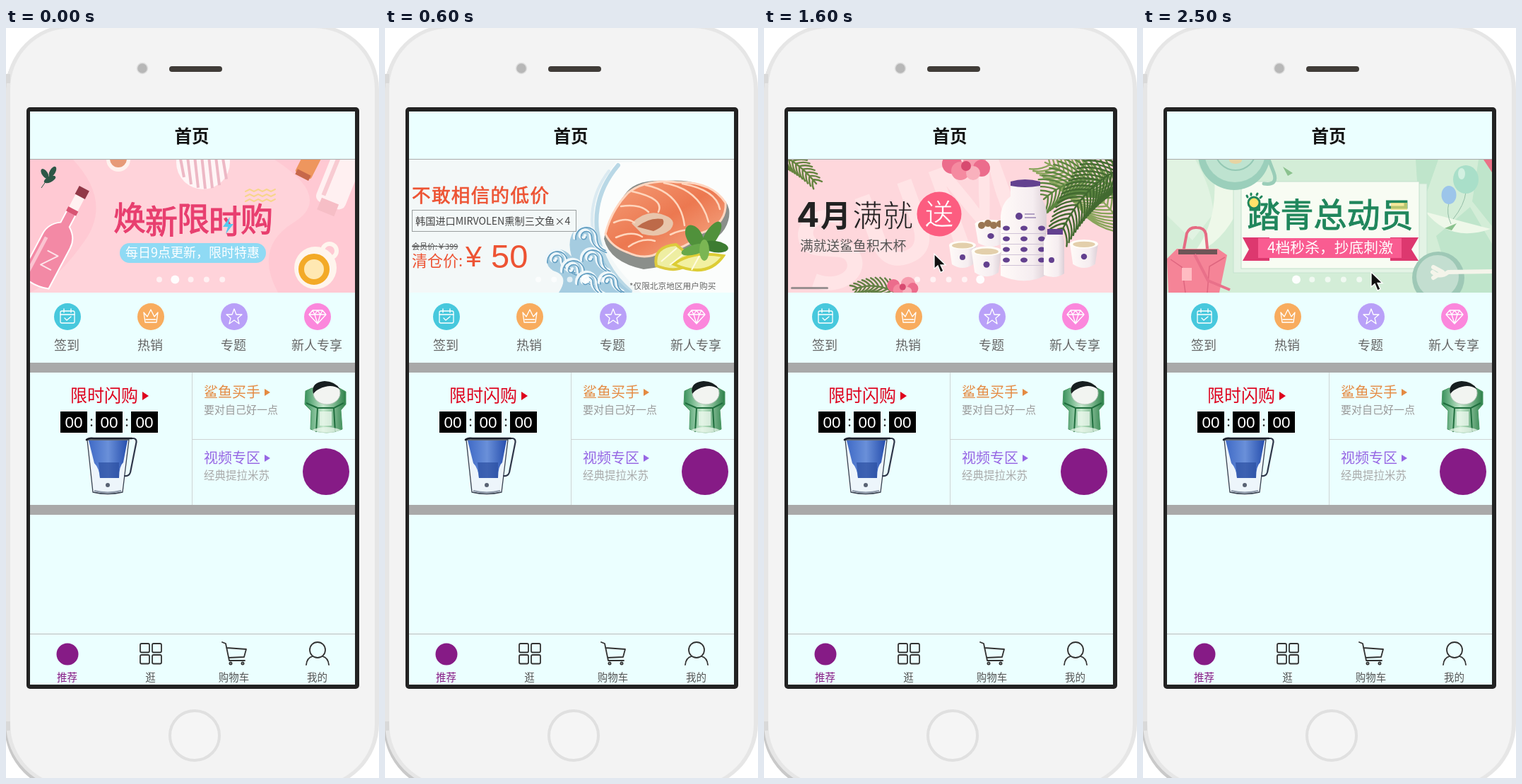
Write an HTML page that moves like this. It is 528 by 1060 pixels and loops after 2.6 s.

```html
<!DOCTYPE html>
<html lang="zh-CN">
<head>
<meta charset="utf-8">
<title>首页</title>
<style>
  html, body { margin: 0; width: 100%; height: 100%; overflow: hidden; background: #fff; }
  svg { display: block; width: 528px; height: 1060px; }
  text { font-family: "Noto Sans CJK SC", "Noto Sans CJK", sans-serif; }
  .mid { text-anchor: middle; }
  .latin { font-family: "Liberation Sans", sans-serif; }
  .line { fill: none; stroke-linecap: round; stroke-linejoin: round; }
</style>
</head>
<body>
<svg viewBox="0 0 528 1060">
  <defs>
    <clipPath id="banner"><rect x="34" y="186" width="460" height="188"/></clipPath>
    <clipPath id="page"><rect x="34" y="186" width="460.5" height="188"/></clipPath>
    <linearGradient id="blue" x2="1"><stop stop-color="#3f6ac6"/><stop offset=".5" stop-color="#6a90d9"/><stop offset="1" stop-color="#274fae"/></linearGradient>
    <linearGradient id="glass" x2="1"><stop stop-color="#37905a"/><stop offset=".45" stop-color="#c5e8cd"/><stop offset="1" stop-color="#2c8049"/></linearGradient>
    <linearGradient id="milk" x2="1"><stop stop-color="#fffaf8"/><stop offset=".7" stop-color="#f5edf0"/><stop offset="1" stop-color="#dccfd6"/></linearGradient>
    <linearGradient id="meat" x2="1" y2="1"><stop stop-color="#f5a07a"/><stop offset=".5" stop-color="#ec7850"/><stop offset="1" stop-color="#f7b290"/></linearGradient>
    <g id="jug">
      <path d="M3 5H62L53 79Q32 84 11 79Z" fill="#edf5fb" stroke="#39404f" stroke-width="1.3"/>
      <path d="M5 6H60L54 37Q48 42 48 59H21Q20 45 13 38Z" fill="url(#blue)"/>
      <path d="M19 37H48V59H21Z" fill="#274a9c" opacity=".65"/>
      <path class="line" d="M58 3H69Q74 4 72 11L64 51Q62 57 56 56" stroke="#30374a" stroke-width="2.2"/>
      <path class="line" d="M2 5Q5 2 12 3H66" stroke="#1b1f2b" stroke-width="2.6"/>
      <circle cx="32" cy="69" r="3" fill="#596273"/>
      <path d="M13 77Q32 82 51 77" fill="none" stroke="#8c98a8" stroke-width="2"/>
    </g>
    <g id="cup">
      <path d="M-19 -14L-15 13Q0 23 15 13L19 -14Z" fill="url(#milk)"/>
      <ellipse cy="-14" rx="19" ry="6" fill="#fffdf8"/><ellipse cy="-13.5" rx="15" ry="4" fill="#e3cfab"/>
      <circle cy="3" r="4" fill="#63408e"/>
    </g>
    <g id="flower" fill="#ec6c8c">
      <circle cx="-18" r="14"/><circle cx="14" cy="-3" r="16" fill="#f79cae"/><circle cx="24" cy="6" r="12"/>
      <circle cx="-6" cy="10" r="13" fill="#f58aa0"/><circle cx="12" cy="13" r="10" fill="#f9b1bd"/><circle cx="2" cy="3" r="7" fill="#d84a70"/>
    </g>
  </defs>

  <!-- phone -->
  <rect x="-2" y="1" width="480" height="1078" rx="92" fill="#c9c9c9"/>
  <rect x="0" y="-5" width="528" height="1080" rx="92" fill="#e6e6e6"/>
  <path d="M0 65H6V78H0ZM0 980H6V993H0Z" fill="#d9d9d9"/>
  <rect x="6" y="0" width="516" height="1070" rx="86" fill="#f3f3f3"/>
  <circle cx="193" cy="57" r="7.5" fill="#b7b7b7" stroke="#dedede" stroke-width="1.5"/>
  <rect x="231" y="54" width="75" height="8" rx="4" fill="#403c38"/>
  <circle cx="267" cy="1000" r="35" fill="#f5f5f5" stroke="#e0e0e0" stroke-width="4"/>
  <rect x="29" y="112" width="471" height="822" rx="5" fill="#222"/>
  <rect x="34" y="118" width="460" height="810" fill="#ebffff"/>
  <text class="mid" x="263" y="162" font-size="24.5" font-weight="700" fill="#111">首页</text>
  <path d="M34 185.5H494" stroke="#aaa"/>

  <g clip-path="url(#banner)">
    <!-- cosmetics -->
    <g class="slide" clip-path="url(#page)">
      <rect x="34" y="186" width="460" height="188" fill="#ffd3da"/>
      <path d="M34 186H95Q150 245 112 300T34 374ZM380 186H494V374H385Q350 310 407 275T380 186Z" fill="#ffc5cf" opacity=".65"/>
      <g fill="#2d5747"><ellipse cx="55" cy="206" rx="4" ry="8" transform="rotate(-35 55 206)"/><ellipse cx="66" cy="203" rx="4" ry="8" transform="rotate(30 66 203)"/><ellipse cx="62" cy="214" rx="4" ry="9" transform="rotate(65 62 214)"/></g>
      <path d="M50 226L68 200" stroke="#2d5747"/>
      <g transform="translate(108 232) rotate(28)">
        <path d="M-7 28H7V52Q22 62 22 78V143Q0 151 -22 143V78Q-22 62 -7 52Z" fill="#f389a5" stroke="#fff" stroke-width="2"/>
        <path d="M-15 80V139" stroke="#fbc4d1" stroke-width="5"/><path class="line" d="M-4 96H12L-4 118H12" stroke="#fde3e9" stroke-width="2"/>
        <rect x="-7" y="4" width="14" height="26" fill="#fff1f1"/><rect x="-8" y="-6" width="16" height="13" fill="#913847"/><rect x="-8" y="27" width="16" height="7" fill="#d85473"/>
      </g>
      <circle cx="159" cy="186" r="17" fill="#fff1ed"/><circle cx="159" cy="185" r="12" fill="#e79a77"/>
      <g id="stripes"><circle cx="279" cy="190" r="38" fill="#fff5f6"/></g>
      <g transform="translate(430 190) rotate(27)"><rect x="-13" y="-18" width="25" height="39" rx="3" fill="#ee965e"/><rect x="-11" y="16" width="21" height="8" fill="#c7684a"/></g>
      <g transform="translate(471 215) rotate(22)"><rect x="-22" y="-55" width="44" height="94" rx="10" fill="#fff0f1"/><rect x="-13" y="32" width="26" height="18" fill="#f6bec6"/><path d="M-12 -45V28" stroke="#f8cbd2" stroke-width="6"/></g>
      <circle cx="458" cy="315" r="10" fill="none" stroke="#fff5ee" stroke-width="6"/><circle cx="438" cy="339" r="30" fill="#fff5ed"/><circle cx="436" cy="341" r="18" fill="#ffe8b2" stroke="#f3aa27" stroke-width="8"/>
      <path class="line" d="M339 231l6 -3 6 3 6 -3 6 3 6 -3 6 3 6 -3M339 238l6 -3 6 3 6 -3 6 3 6 -3 6 3 6 -3M339 245l6 -3 6 3 6 -3 6 3 6 -3 6 3 6 -3" stroke="#f7d58d" stroke-width="2"/>
      <text x="152 197 242 287 332" y="285 290 286 290 287" font-size="46" font-weight="500" fill="#e83f6f" stroke="#e83f6f" stroke-width="1.2">焕新限时购</text>
      <path d="M317 267L307 281H314L311 291L322 277H315Z" fill="#55c9ef"/>
      <rect x="161" y="304" width="207" height="28" rx="14" fill="#8fdaf4"/>
      <text class="mid" x="264" y="324" font-size="18" fill="#fff">每日9点更新，限时特惠</text>
    </g>

    <!-- flash sale -->
    <g class="slide" clip-path="url(#page)">
      <rect x="34" y="186" width="460" height="188" fill="#f3cf08"/>
      <g fill="#fadd52" opacity=".75"><circle cx="75" cy="218" r="37"/><circle cx="190" cy="196" r="25"/><circle cx="245" cy="330" r="45"/><circle cx="145" cy="358" r="32"/><circle cx="58" cy="333" r="24"/></g>
      <path d="M323 186H471Q495 209 500 235V374H335Q276 329 278 257Q281 217 323 186Z" fill="#effbff"/>
      <path d="M297 209L309 186H331L319 208ZM470 186H494V214Q480 207 470 186ZM79 374L92 349L133 357L128 374ZM190 374L199 352L236 359L231 374Z" fill="#2564a7"/>
      <path d="M304 211L314 190L324 196L316 211ZM477 186H488L494 202ZM93 374L96 360H116L113 374ZM207 374L210 363L225 365L222 374Z" fill="#fff06b"/>
      <g fill="#ef2221"><circle cx="121" cy="206" r="4"/><circle cx="263" cy="201" r="5"/><circle cx="41" cy="369" r="10"/></g>
      <g font-weight="900">
        <text transform="translate(75 246) rotate(-6)" font-size="18.5" font-weight="700" fill="#171717">总有你想不到的<tspan fill="#e9201e">低价</tspan></text>
        <text transform="translate(45 310) rotate(-6.5)" font-size="62" fill="#f01917">限时<tspan font-size="55" fill="#171717">抢购</tspan></text>
        <text transform="translate(69 335) rotate(-6)" font-size="19" font-weight="700" fill="#171717">仅限今日<tspan font-family="Inter, sans-serif" font-size="20">12:00–23:59</tspan></text>
      </g>
      <use href="#jug" transform="translate(355 215) scale(1.27 1.24)"/>
      <path d="M494 316H272A12 12 0 0 0 272 340H494ZM494 345H249A11 11 0 0 0 249 367H494Z" fill="#ef1115"/>
      <g fill="#fff">
        <text x="289" y="333.5" font-size="16.6">德QVZ滤水壶阻垢款2.7蓝</text>
        <text x="251" y="362" font-size="16.5">闪购价</text><text x="317" y="361" font-size="16">¥199</text>
        <text x="390" y="361" font-size="15.5" fill="#ffd6d6">会员价: ¥208</text>
      </g>
      <path d="M382 356H494" stroke="#ffd6d6"/>
    </g>

    <!-- salmon -->
    <g class="slide" clip-path="url(#page)">
      <rect x="34" y="186" width="460" height="188" fill="#f3f8f8"/>
      <path d="M327 190Q280 250 318 321Q331 345 362 374H494V186Z" fill="#fbfdfc"/>
      <path class="line" d="M330 194Q295 235 300 286Q307 338 347 372" stroke="#b9d8e6" stroke-width="6"/>
      <path class="line" d="M317 202Q286 242 295 294" stroke="#dbeaf1" stroke-width="4"/>
      <path d="M246 374Q262 350 238 343Q222 332 235 318Q249 306 264 323Q256 294 273 282Q295 276 301 300Q309 345 350 374Z" fill="#a5cce0"/>
      <g id="waves" class="line"></g>
      <path d="M310 298Q316 265 339 236Q353 213 398 216Q445 212 473 237Q492 249 486 272Q479 298 446 306Q418 336 366 341Q318 331 310 298Z" fill="#8b8f8b"/>
      <path d="M312 291Q320 258 344 233Q369 213 414 218Q463 217 482 247Q484 278 447 290Q427 314 391 315Q371 330 343 317Q320 309 312 291Z" fill="url(#meat)" stroke="#ffd6c0" stroke-width="3"/>
      <path d="M349 276Q370 256 391 263Q416 270 404 285Q388 298 364 291Z" fill="#e8c5ab"/>
      <path d="M357 281Q374 267 393 270Q399 279 380 287Z" fill="#bd6a49"/>
      <path class="line" d="M350 231Q396 241 387 260M369 222Q418 232 424 279M334 252Q361 248 373 260M395 219Q446 228 458 274M421 220Q469 229 474 256M324 275Q342 267 353 275M327 296Q350 286 364 295M345 309Q364 296 382 301M404 292Q425 282 441 287" stroke="#ffd6bd" stroke-width="2.5"/>
      <path d="M384 336Q379 309 412 306L436 326Q420 350 384 336Z" fill="#eeeea2" stroke="#ddca3d" stroke-width="4"/>
      <path d="M409 334Q433 314 479 322Q456 355 409 334Z" fill="#f2f0a1" stroke="#ddcd35" stroke-width="4"/>
      <path d="M391 330L413 311M403 335L426 317M434 342L445 322" stroke="#fffbe0" stroke-width="2"/>
      <g fill="#50913b"><ellipse cx="438" cy="295" rx="11" ry="18" transform="rotate(-30 438 295)"/><ellipse cx="463" cy="294" rx="9" ry="23" transform="rotate(32 463 292)"/><ellipse cx="439" cy="313" rx="20" ry="7" transform="rotate(-15 439 313)" fill="#67a84a"/><ellipse cx="467" cy="309" rx="19" ry="8" transform="rotate(8 467 309)" fill="#3d7c31"/><ellipse cx="452" cy="314" rx="7" ry="15" fill="#7bb653"/></g>
      <text x="38" y="246" font-size="26.5" letter-spacing="1.4" font-weight="500" fill="#ed5333" stroke="#ed5333" stroke-width=".7">不敢相信的低价</text>
      <rect x="38.5" y="257.5" width="232" height="30" fill="none" stroke="#9a9f9f"/>
      <text x="43" y="277.5" font-size="14.2" fill="#444">韩国进口MIRVOLEN熏制三文鱼×4</text>
      <text x="38" y="313" font-size="11" fill="#555" text-decoration="line-through">会员价:￥399</text>
      <text x="38" y="337" font-size="22" fill="#ed5333">清仓价:</text>
      <text class="latin" x="114" y="337" font-size="41" fill="#ed5333">¥</text><text class="latin" x="150" y="339" font-size="47" fill="#ed5333">50</text>
      <text x="346" y="369" font-size="11.7" fill="#666">*仅限北京地区用户购买</text>
    </g>

    <!-- cups -->
    <g class="slide" clip-path="url(#page)">
      <rect x="34" y="186" width="460" height="188" fill="#fed7dc"/>
      <text transform="translate(67 381) rotate(-20)" font-size="148" font-weight="700" fill="#ffe4e6">SUM</text>
      <g id="fronds"></g>
      <use href="#flower" x="284" y="192"/><use href="#flower" transform="translate(195 364) scale(.65)"/>
      <text y="281" font-size="43" font-weight="700" fill="#222"><tspan x="46" font-family="Inter, sans-serif" font-size="48">4</tspan><tspan x="80">月</tspan><tspan x="125" font-weight="300" stroke="#fed7dc" stroke-width=".9">满就</tspan></text>
      <circle cx="248" cy="263" r="31.5" fill="#fc5d80"/><text class="mid" x="248" y="278" font-size="41" font-weight="300" fill="#fff" stroke="#fc5d80" stroke-width=".8">送</text>
      <text x="51" y="315" font-size="18.8" fill="#555">满就送鲨鱼积木杯</text>
      <use href="#cup" transform="translate(321 291) scale(1.18 1)"/>
      <g fill="#9a7653"><circle cx="308" cy="279" r="5"/><circle cx="317" cy="276" r="5"/><circle cx="325" cy="279" r="5"/><circle cx="334" cy="277" r="5"/></g>
      <use href="#cup" x="281" y="321"/><use href="#cup" transform="translate(453 320) scale(1.05)"/>
      <path d="M349 220H391V238Q401 252 400 266V349Q370 365 335 350V266Q336 248 349 238Z" fill="url(#milk)"/>
      <path d="M349 217Q369 211 391 217V223Q369 227 349 223Z" fill="#63418f"/>
      <circle cx="361" cy="266" r="5" fill="#63418f"/><path d="M369 263H383M369 268H385" stroke="#9b86b4" stroke-width="1.5"/>
      <g id="marks" fill="#63418f"></g>
      <path d="M401 290H422L425 301V347Q412 356 396 349V301Z" fill="url(#milk)"/><path d="M401 284H423V292H401Z" fill="#63418f"/><circle cx="407" cy="328" r="4" fill="#63418f"/>
      <use href="#cup" transform="translate(315 331) scale(1.12)"/>
    </g>

    <!-- spring -->
    <g class="slide" clip-path="url(#page)">
      <rect x="34" y="186" width="460" height="188" fill="#d3edd7"/>
      <path d="M386 186H418L391 263ZM475 186H494V280L466 245ZM415 294L463 253L494 305V374H440Z" fill="#bfe5cb"/>
      <path d="M34 186H74Q96 223 100 262L70 300L34 265Z" fill="#e1f3e2"/>
      <path d="M98 186Q112 270 70 320Q122 302 145 230M400 260Q435 304 492 284" fill="#eef8e9"/>
      <rect x="128" y="220" width="274" height="126" fill="#e3f3e5" stroke="#c5e3d0"/>
      <rect x="139" y="217" width="252" height="123" fill="#f8fcf3" stroke="#c1e0cb"/>
      <path class="line" d="M171 220Q192 223 185 204L178 186" stroke="#9acdb8" stroke-width="5"/>
      <circle cx="129" cy="178" r="51" fill="#9bcfbb"/><circle cx="130" cy="175" r="43" fill="#bee3d0"/><circle cx="131" cy="172" r="29" fill="none" stroke="#94c8b4" stroke-width="2"/><ellipse cx="131" cy="187" rx="9" ry="5" fill="#e7d4a3"/>
      <path d="M433 247Q429 262 436 277M457 232Q455 250 439 270" fill="none" stroke="#94bda6"/>
      <ellipse cx="457" cy="214" rx="18" ry="20" fill="#a9dfc9"/><ellipse cx="433" cy="236" rx="10.5" ry="13" fill="#9cc5ea"/><ellipse cx="451" cy="206" rx="5" ry="8" fill="#d2f0e1"/>
      <path d="M482 186H494V204Z" fill="#ea7187"/><path d="M198 196L212 205L205 209ZM427 283L444 276L437 286Z" fill="#8bc28e"/>
      <path class="line" d="M56 322L62 290Q66 281 76 282Q87 282 89 291L92 322" stroke="#e56b83" stroke-width="4"/>
      <path d="M34 326L48 312H106L119 321L108 374H36Z" fill="#f58497"/><path d="M50 313H105V320H50Z" fill="#6d5557"/><path d="M39 327L55 338L60 374M116 324L94 337L91 374" fill="none" stroke="#de667f" stroke-width="1.5"/><path d="M73 320L92 357L123 370" fill="none" stroke="#e9718a" stroke-width="4"/><rect x="55" y="339" width="14" height="18" fill="#ffbcc2"/>
      <circle cx="418" cy="353" r="37" fill="#9ec8b6"/><circle cx="417" cy="351" r="30" fill="#c3ded0"/><path class="line" d="M410 345Q420 354 432 345L494 344M411 338L424 345L411 353" stroke="#f4f4ea" stroke-width="6"/>
      <path d="M141 296H179V329H141L150 313ZM390 296H350V329H390L380 313Z" fill="#dd386f"/><path d="M163 297H366V325H163Z" fill="#f95c91"/>
      <text class="mid" x="265" y="281" font-size="47" font-weight="500" fill="#20865c" stroke="#20865c">踏青总动员</text>
      <circle cx="157" cy="247" r="8" fill="#ffe26a" stroke="#20865c" stroke-width="3"/><path class="line" d="M148 239l-1 -2M153 236l0 -2M161 236l1 -2M166 240l2 -2" stroke="#20865c" stroke-width="3"/>
      <rect x="351" y="247" width="23" height="10" fill="#f5e178" opacity=".7"/>
      <text class="mid" x="265" y="318" font-size="20.8" font-weight="300" fill="#fff">4档秒杀，抄底刺激</text>
    </g>
    <g id="dots" fill="#fff"></g>
    <rect id="indicator" x="38" y="366" width="53" height="3" rx="1.5" fill="#777" opacity=".75"/>
  </g>

  <!-- shortcuts -->
  <g id="shortcuts"></g>
  <g class="line" stroke="#fff" stroke-width="1.3">
    <rect x="77" y="400" width="20" height="17" rx="2"/><path d="M77 405H97M82 397V402M92 397V402M83 410L86 413L92 408"/>
    <path d="M195 402L200 408L205 398L210 408L215 402L213 416H197ZM198 412H212"/>
    <path d="M323 397L326 405L334 405L328 410L330 418L323 413L316 418L318 410L312 405L320 405Z"/>
    <path d="M434 399H448L453 405L441 418L429 405ZM429 405H453M434 399L437 405L441 418L445 405L448 399M437 405L441 399L445 405"/>
  </g>

  <!-- panels -->
  <path d="M34 473H494V487H34ZM34 674H494V688H34Z" fill="#a9a9a9"/>
  <path d="M263.5 487V674M263 581.5H494" stroke="#cfd4d4"/>
  <text x="91" y="528" font-size="24" fill="#de001d">限时闪购</text><path d="M193 514L202 520L193 526Z" fill="#de001d"/>
  <g id="clock"></g>
  <use href="#jug" x="112" y="577"/>
  <text x="280" y="522" font-size="20" fill="#e48a42">鲨鱼买手</text><path d="M366 510L374 515L366 520Z" fill="#e48a42"/>
  <text x="280" y="544.5" font-size="15" fill="#999">要对自己好一点</text>
  <text x="280" y="615" font-size="20" fill="#9666e4">视频专区</text><path d="M366 603L374 608L366 613Z" fill="#9666e4"/>
  <text x="280" y="638" font-size="15.5" fill="#aaa">经典提拉米苏</text>
  <path d="M424 513L433 509H472L481 514V532L474 540L476 567Q454 577 431 567L432 541L423 532Z" fill="url(#glass)" stroke="#4a9864"/>
  <path d="M425 530L441 537L439 571M478 530L464 537L466 571M441 537H464" fill="none" stroke="#1f6e3e" stroke-width="2"/>
  <path d="M444 542H461V562H444ZM433 568Q454 560 474 568Q454 577 433 568Z" fill="#ecf8ee" opacity=".75"/>
  <ellipse cx="454" cy="516" rx="19" ry="16" fill="#f2f4f1" stroke="#b3c6b8"/>
  <path d="M435 517Q431 501 451 499Q467 500 473 511Q464 504 452 507Q440 510 435 517Z" fill="#171e20"/>
  <circle cx="453" cy="627" r="33" fill="#861b86"/>

  <!-- tabs -->
  <path d="M34 856.5H494" stroke="#bbb"/>
  <circle cx="87" cy="885" r="15.5" fill="#861b86"/>
  <g class="line" stroke="#333" stroke-width="1.8">
    <rect x="190" y="870" width="13" height="12.5" rx="2"/><rect x="207" y="870" width="13" height="12.5" rx="2"/><rect x="190" y="886" width="13" height="12.5" rx="2"/><rect x="207" y="886" width="13" height="12.5" rx="2"/>
    <path d="M306 868L311 870L316 894H338M312 876L340 878L337 889L315 890"/><circle cx="318" cy="898" r="1.6"/><circle cx="335" cy="898" r="1.6"/>
    <circle cx="441" cy="879" r="11"/><path d="M425 900Q426 890 434 888M448 888Q456 890 457 900"/>
  </g>
  <g id="tabs"></g>
  <path id="cursor" d="M0 0V21L5 16.500L9 26L13 24L9 15.500H16Z" fill="#111" stroke="#fff" stroke-width="1.3"/>
</svg>
<script>
  const LOOP = 2600, STEP = 100, PAGE = 460;
  const $ = id => document.getElementById(id);
  const add = (id, markup) => $(id).insertAdjacentHTML('beforeend', markup);
  const repeat = (n, draw) => Array.from({length: n}, (_, i) => draw(i)).join('');

  // Leaflets sweep towards the tip on both sides of a curved stem.
  function frond(x0, y0, cx, cy, x1, y1, count, length, color) {
    const leaves = repeat(count, i => {
      const u = i / count, v = 1 - u;
      const x = v * v * x0 + 2 * u * v * cx + u * u * x1;
      const y = v * v * y0 + 2 * u * v * cy + u * u * y1;
      const angle = Math.atan2(v * (cy - y0) + u * (y1 - cy), v * (cx - x0) + u * (x1 - cx));
      const size = length * (1 - .55 * u);
      const point = (r, a) => `${x + r * Math.cos(angle + a)} ${y + r * Math.sin(angle + a)}`;
      return [-1, 1].map(s => `M${x} ${y}Q${point(size * .55, s * .95)} ${point(size, s * .65)}`).join('');
    });
    add('fronds', `<path class="line" stroke="${color}" stroke-width="2.4" d="M${x0} ${y0}Q${cx} ${cy} ${x1} ${y1}${leaves}"/>`);
  }
  frond(515, 290, 475, 225, 398, 190, 22, 62, '#8aa55c');
  frond(515, 235, 455, 190, 396, 242, 20, 64, '#5b8540');
  frond(515, 195, 455, 215, 420, 290, 20, 55, '#426a30');
  frond(20, 178, 48, 188, 74, 220, 11, 26, '#65843f');
  frond(192, 378, 160, 356, 126, 370, 11, 22, '#638044');

  add('stripes', repeat(7, i => {
    const x = 248 + i * 10, half = Math.sqrt(1400 - (x - 279) ** 2);
    return `<path d="M${x - 4} ${190 - half}L${x + 4} ${190 + half}" stroke="#edb8c5" stroke-width="4"/>`;
  }));
  // Curled crests with trailing foam lines.
  const crests = [[242, 326, 14], [283, 293, 15], [265, 340, 15], [292, 324, 14], [285, 357, 14], [315, 356, 12]];
  add('waves', crests.map(([x, y, r]) => {
    const curl = `M${x} ${y}a${r / 4} ${r / 4} 0 0 1 ${-r / 2} 0a${r / 2} ${r / 2} 0 0 1 ${r} 0q0 ${r} ${r * 1.4} ${r * 1.5}` +
      `M${x - r} ${y + 4}a${r} ${r} 0 0 1 ${r * 2} -4q0 ${r} ${r * .8} ${r * 1.3}`;
    return `<path d="${curl}" stroke="#eff7fa" stroke-width="4"/><path d="${curl}" stroke="#5f9cc0" stroke-width="1.6" transform="translate(2 2)"/>`;
  }).join(''));
  add('marks', repeat(12, i => {
    const x = 343 + i % 3 * 25, y = 283 + (i / 3 | 0) * 15;
    return `<ellipse cx="${x}" cy="${y}" rx="5" ry="3.4"/>` + (i % 3 ? '' : `<path d="M336 ${y + 7.5}H399" stroke="#cfc2d6"/>`);
  }));
  add('dots', repeat(5, i => `<circle cx="${217 + i * 22.3}" cy="355.5"/>`));

  const label = (x, y, size, fill, text, type = '') => `<text class="mid ${type}" x="${x}" y="${y}" font-size="${size}" fill="${fill}">${text}</text>`;
  const columns = [87, 205, 323, 441];
  add('shortcuts', repeat(4, i =>
    `<circle cx="${columns[i]}" cy="408" r="19" fill="${['#47c8dd', '#f8ac5e', '#b9a0f8', '#fb87dc'][i]}"/>` +
    label(columns[i] - 1, 454.5, 18, '#666', ['签到', '热销', '专题', '新人专享'][i])));
  add('tabs', repeat(4, i => label(columns[i] - .5, 922.5, 14.5, i ? '#555' : '#861b86', ['推荐', '逛', '购物车', '我的'][i])));
  add('clock', repeat(3, i =>
    `<rect x="${77 + i * 50}" y="542" width="38" height="30" fill="#000"/>` + label(96 + i * 50, 565, 22.5, '#fff', '00', 'latin') +
    (i < 2 ? label(121 + i * 50, 563, 20, '#222', ':') : '')));

  // Keys are [time, ...values].
  const scroll = [[0, 0], [200, 1], [400, 1], [600, 2], [1000, 2], [1100, 2.28], [1200, 2.84], [1300, 2.989], [1400, 3],
    [1800, 3], [1900, 3.06], [2000, 3.2], [2100, 3.437], [2200, 3.78], [2300, 3.95], [2400, 4]];
  const pointer = [[900, 445, 318], [1000, 430, 316], [1300, 310, 314], [1800, 195, 323], [2100, 71, 330], [2400, 245, 343], [2500, 323, 345]];
  function sample(keys, t) {
    const i = keys.findIndex(key => key[0] >= t);
    if (i < 0) return keys.at(-1).slice(1);
    if (!i) return keys[0].slice(1);
    const a = keys[i - 1], b = keys[i], u = (t - a[0]) / (b[0] - a[0]);
    return a.slice(1).map((v, k) => v + (b[k + 1] - v) * u);
  }

  const slides = document.querySelectorAll('.slide');
  const dots = [...$('dots').children];
  function render(now) {
    const t = Math.floor(now % LOOP / STEP) * STEP;
    const [position] = sample(scroll, t);
    slides.forEach((slide, i) => slide.setAttribute('transform', `translate(${(i - position) * PAGE} 0)`));
    const active = (Math.round(position) + 1) % 5;
    dots.forEach((dot, i) => {
      dot.setAttribute('r', i === active ? 6 : 4);
      dot.setAttribute('opacity', i === active ? .95 : .65);
    });
    $('indicator').style.display = t >= 1100 && t < 2400 ? '' : 'none';
    const [x, y] = sample(pointer, t);
    $('cursor').setAttribute('transform', `translate(${x} ${y})`);
    $('cursor').style.display = t >= 900 ? '' : 'none';
  }
  const start = performance.now();
  function tick() {
    render(performance.now() - start);
    requestAnimationFrame(tick);
  }
  tick();
</script>
</body>
</html>
```
